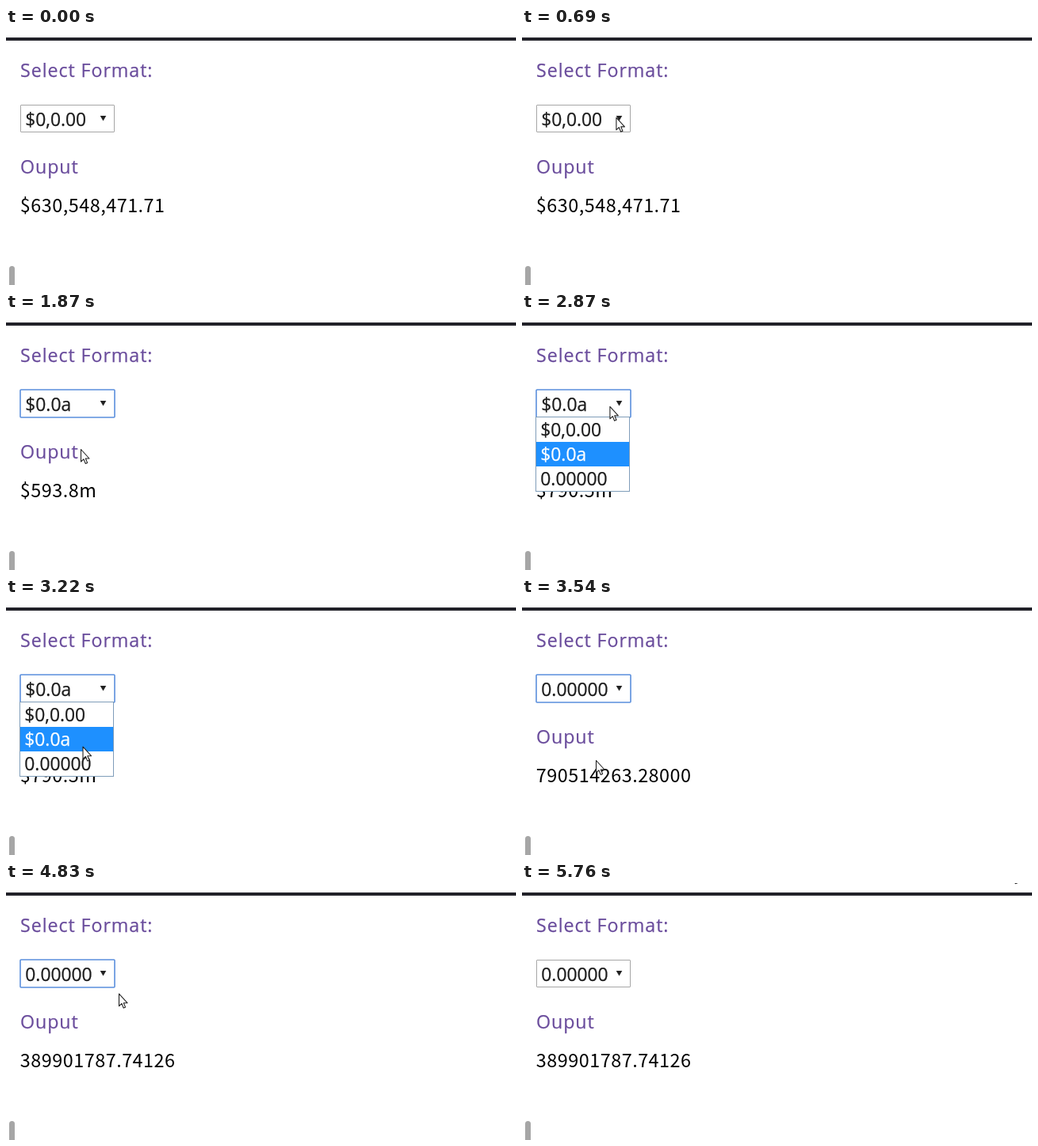
An HTML page that plays this animation: 643 px wide and 325 px high, repeating every 5830 ms.

```html
<!DOCTYPE html>
<html lang="en">
<head>
<meta charset="utf-8">
<title>Number format</title>
<style>
  html, body { margin: 0; width: 100%; height: 100%; overflow: hidden; background: #fff; }
  svg { display: block; width: 643px; height: 325px; }
  text { font-family: "Open Sans", "Noto Sans", sans-serif; white-space: pre; stroke-width: .25px; }
  .head { font-size: 23.2px; letter-spacing: .95px; fill: #6a4c9c; stroke: #6a4c9c; }
  .item { font-size: 22.8px; fill: #1c1c1c; stroke: #1c1c1c; }
  .item.on { fill: #fff; stroke: #fff; }
  .out {
    font-family: "Noto Sans CJK SC", "Noto Sans CJK JP", "Noto Sans CJK", "Open Sans", sans-serif;
    font-size: 23.4px; letter-spacing: .5px; fill: #000;
  }
</style>
</head>
<body>
<svg viewBox="0 0 643 325">
  <rect width="643" height="325" fill="#fff"/>
  <rect y="12" width="643" height="4" fill="#212129"/>
  <rect x="4" y="301" width="7" height="40" rx="3.5" fill="#a6a6a6"/>
  <text class="head" x="18" y="62">Select Format:</text>
  <text class="head" x="18" y="184">Ouput</text>
  <text class="out" id="output" x="17.8" y="233"></text>
  <rect id="box" fill="#fff"/>
  <text class="item" id="chosen" x="24.3" y="124"></text>
  <path d="M118.7 111H126.3L122.5 117.6Z" fill="#222"/>
  <g id="list">
    <rect x="17.5" y="131.5" width="118" height="94" fill="#fff" stroke="#7f9db9"/>
    <rect id="mark" x="18" width="117" height="31" fill="#1e90ff"/>
  </g>
  <path id="cursor" d="M.5 .5V16L3.9 12.8L6.2 18.4L8.6 17.4L6.3 12H11Z"
        fill="#fff" stroke="#222" stroke-width="1.1" stroke-linejoin="round"/>
</svg>
<script>
const LOOP = 5830, STEP = 70, PHASE = 50;
const FORMATS = ["$0,0.00", "$0.0a", "0.00000"];
const ROW = 31, LIST_TOP = 132;

// A new amount arrives every second
const AMOUNTS = [630548471.71, 720019815.79, 593812406.37,
  790514263.28, 427493724.56411, 389901787.74126];

// Moments of the session
const FIRST_OPEN = 900, FIRST_PICK = 1870, SECOND_OPEN = 2510, SECOND_PICK = 3540, BLUR = 5390;

const START = { x: 546, y: -6 };
const MOVES = [
  { from: 120, to: 690, x: 118, y: 113 },
  { from: 1240, to: FIRST_PICK, x: 94, y: 172 },
  { from: FIRST_PICK, to: 2430, x: 111, y: 115 },
  { from: 2790, to: 3360, x: 93, y: 205 },
  { from: SECOND_PICK, to: 4160, x: 236, y: 164 },
  { from: 4200, to: 4690, x: 132, y: 143 },
  { from: 4760, to: 5320, x: 576, y: -3 },
  { from: 5320, to: 5460, x: 600, y: -30 },
  { from: 5700, to: 5720, x: 616, y: -17.6 }
];

const el = id => document.getElementById(id);
const set = (node, attrs) => {
  for (const key in attrs) node.setAttribute(key, attrs[key]);
};
const mix = (a, b, k) => a + (b - a) * k;
const ease = k => k * k * (3 - 2 * k);
const clamp = (v, lo, hi) => Math.max(lo, Math.min(hi, v));

const options = FORMATS.map((label, i) => {
  const text = document.createElementNS("http://www.w3.org/2000/svg", "text");
  set(text, { x: 23.3, y: 156 + i * ROW });
  text.textContent = label;
  el("list").append(text);
  return text;
});

// The pointer is sampled in steps, like a screen recording
function pointer(time) {
  const t = Math.floor((time - PHASE) / STEP) * STEP + PHASE;
  if (t < MOVES[0].from) return { x: 600, y: -40 };
  return MOVES.reduce((p, move) => {
    const k = ease(clamp((t - move.from) / (move.to - move.from), 0, 1));
    return { x: mix(p.x, move.x, k), y: mix(p.y, move.y, k) };
  }, START);
}

function format(value, kind) {
  if (kind === 0) {
    return "$" + value.toLocaleString("en-US",
      { minimumFractionDigits: 2, maximumFractionDigits: 2 });
  }
  return kind === 1 ? "$" + (value / 1e6).toFixed(1) + "m" : value.toFixed(5);
}

function draw(t) {
  const { x, y } = pointer(t);
  const amount = AMOUNTS[Math.min(Math.floor((t + 210) / 1000), AMOUNTS.length - 1)];
  const choice = (t >= FIRST_PICK) + (t >= SECOND_PICK);
  const open = (t >= FIRST_OPEN && t < FIRST_PICK) || (t >= SECOND_OPEN && t < SECOND_PICK);
  const focus = t >= FIRST_OPEN && t < BLUR;
  const active = y < LIST_TOP ? choice : clamp(Math.floor((y - LIST_TOP) / ROW), 0, 2);

  el("output").textContent = format(amount, choice);
  el("chosen").textContent = FORMATS[choice];
  set(el("box"), focus
    ? { x: 18, y: 97, width: 119, height: 35, rx: 1, stroke: "#5a8fdd", "stroke-width": 1.6 }
    : { x: 18.5, y: 97.5, width: 118, height: 34, rx: 0.5, stroke: "#a6a6a6", "stroke-width": 1 });
  set(el("list"), { visibility: open ? "visible" : "hidden" });
  set(el("mark"), { y: LIST_TOP + active * ROW });
  options.forEach((text, i) => set(text, { class: i === active ? "item on" : "item" }));
  set(el("cursor"), { transform: `translate(${x.toFixed(1)} ${y.toFixed(1)})` });
}

const began = performance.now();
function tick() {
  draw((performance.now() - began) % LOOP);
  requestAnimationFrame(tick);
}
tick();
</script>
</body>
</html>
```
